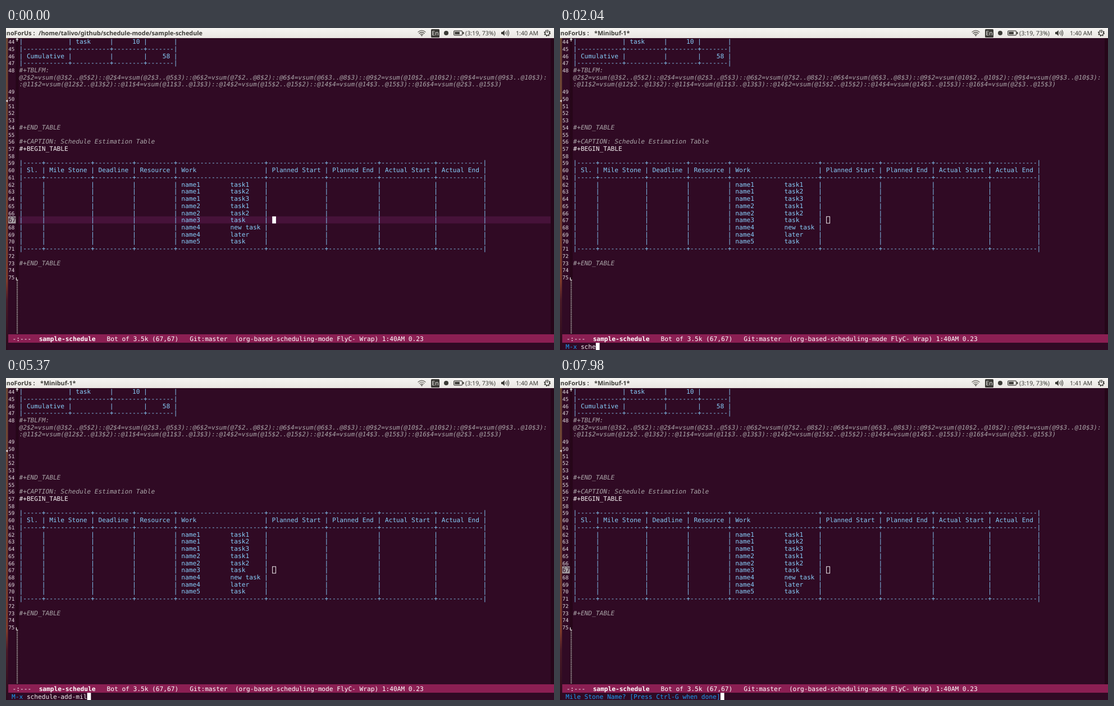
Recreate the animation shown at these times as an HTML page. Size 976 px wide and 574 px high, loop 8 s.

```html
<!DOCTYPE html>
<html lang="en">
<head>
<meta charset="utf-8">
<title>Schedule editor</title>
<style>
  html, body { margin: 0; width: 100%; height: 100%; overflow: hidden; background: #300a24; }
  svg { display: block; width: 976px; height: 574px; }
  text { white-space: pre; text-rendering: geometricPrecision; }
  .m { font: 11.174px "DejaVu Sans Mono", monospace; }
  .n { font-size: 9.2px; fill: #e6e0e3; }
  .ui { font: 10.6px "Noto Sans", "Open Sans", sans-serif; fill: #3c3b37; }
  .title { font-weight: 700; font-size: 10.8px; }
  .tbl { fill: #87cefa; }
  .com { fill: #aaa5a8; font-style: italic; }
  .txt { fill: #f2eef0; }
  .prompt { fill: #1c9cf4; }
</style>
</head>
<body>
<svg id="stage" viewBox="0 0 976 574" xmlns="http://www.w3.org/2000/svg" xml:space="preserve"></svg>
<script>
// Character cell, and the left edges of the minibuffer and the text area
const CW = 6.727, LH = 12.727, MINI = 10, X0 = MINI + 2 * CW;
const stage = document.getElementById('stage');
const base = row => 28.1 + row * LH;
const rect = (x, y, w, h, fill, more = '') =>
  `<rect x="${x}" y="${y}" width="${w}" height="${h}" fill="${fill}" ${more}/>`;
const text = (x, y, cls, s, more = '') =>
  `<text x="${x}" y="${y}" class="${cls}" ${more}>${s}</text>`;
const path = (d, stroke, w, more = '') =>
  `<path d="${d}" fill="none" stroke="${stroke}" stroke-width="${w}" ${more}/>`;

// Table helpers: column widths include the padding spaces
const rule = ws => '|' + ws.map(w => '-'.repeat(w)).join('+') + '|';
const cells = (ws, vals) => '|' + ws.map((w, i) => (' ' + (vals[i] || '')).padEnd(w)).join('|') + '|';

const sums = [12, 10, 8, 7];
const plan = [5, 12, 10, 10, 23, 15, 13, 14, 12];
const heads = ['Sl.', 'Mile Stone', 'Deadline', 'Resource', 'Work',
  'Planned Start', 'Planned End', 'Actual Start', 'Actual End'];
const works = [['name1', 'task1'], ['name1', 'task2'], ['name1', 'task3'], ['name2', 'task1'],
  ['name2', 'task2'], ['name3', 'task'], ['name4', 'new task'], ['name4', 'later'], ['name5', 'task']];

// [line number, class, content]; a null number continues the line above
const lines = [
  [44, 'tbl', cells(sums, ['', 'task', '    10'])],
  [45, 'tbl', rule(sums)],
  [46, 'tbl', cells(sums, ['Cumulative', '', '', '   58'])],
  [47, 'tbl', rule(sums)],
  [48, 'com', '#+TBLFM:'],
  [null, 'com', '@2$2=vsum(@3$2..@5$2)::@2$4=vsum(@2$3..@5$3)::@6$2=vsum(@7$2..@8$2)::@6$4=vsum(@6$3..@8$3)::@9$2=vsum(@10$2..@10$2)::@9$4=vsum(@9$3..@10$3):'],
  [null, 'com', ':@11$2=vsum(@12$2..@13$2)::@11$4=vsum(@11$3..@13$3)::@14$2=vsum(@15$2..@15$2)::@14$4=vsum(@14$3..@15$3)::@16$4=vsum(@2$3..@15$3)'],
  [49], [50], [51], [52], [53],
  [54, 'com', '#+END_TABLE'],
  [55],
  [56, 'com', '#+CAPTION: Schedule Estimation Table'],
  [57, 'txt', '#+BEGIN_TABLE'],
  [58],
  [59, 'tbl', rule(plan)],
  [60, 'tbl', cells(plan, heads)],
  [61, 'tbl', rule(plan)],
  ...works.map(([who, job], i) => [62 + i, 'tbl', cells(plan, ['', '', '', '', who.padEnd(13) + job])]),
  [71, 'tbl', rule(plan)],
  [72],
  [73, 'com', '#+END_TABLE'],
  [74], [75]
];

const numbers = lines.map(([n], i) => n ? text(4.2, base(i), 'm n', n, n === 67 ? 'id="num"' : '') : '').join('');
const body = lines.map(([, cls, s], i) => s ? text(X0, base(i), 'm ' + cls, s) : '').join('');

const panel = rect(0, 0, 976, 18, 'url(#bar)')
  + text(51.5, 12.8, 'ui title', 'noForUs :', 'text-anchor="end"')
  + text(58, 12.8, 'ui title', '', 'id="title"')
  + path('M733.5 7.5Q740.5 1.5 747.5 7.5', '#77746e', 1.3)
  + path('M735.5 10Q740.5 5.5 745.5 10', '#55524d', 1.3, 'id="wifi"')
  + path('M737.7 12Q740.5 9.6 743.3 12', '#55524d', 1.3)
  + '<circle cx="740.5" cy="13.4" r="1.1" fill="#3c3b37"/>'
  + rect(757, 2, 15, 15, '#3c3b37', 'rx="1.5"')
  + text(764.5, 13, 'ui', 'En', 'text-anchor="middle" style="fill:#f5f3f0"')
  + '<circle cx="784" cy="9" r="4" fill="#3c3b37"/>'
  + rect(797.6, 5.1, 15, 7.8, 'none', 'rx="1.5" stroke="#3c3b37" stroke-width="1.2"')
  + rect(799.3, 6.8, 8.6, 4.4, '#3c3b37') + rect(813.5, 7, 2, 4, '#3c3b37')
  + text(818, 12.8, 'ui', '(3:19, 73%)')
  + '<path d="M882 7h2.4l3.4-3v10l-3.4-3h-2.4z" fill="#3c3b37"/>'
  + path('M889.5 6.8q1.6 2.2 0 4.4M891.6 5q3 4 0 8M893.8 3.5q4 5.5 0 11', '#3c3b37', 1.1)
  + text(908, 12.8, 'ui', '', 'id="clock"')
  + '<circle cx="964" cy="9" r="3.9" fill="none" stroke="#3c3b37" stroke-width="1.5"/>'
  + '<circle cx="964" cy="9" r="5.1" fill="none" stroke="#3c3b37" stroke-width="1.8" stroke-dasharray="2 2.006"/>'
  + rect(962.2, 2.5, 3.6, 4.5, '#efedea') + rect(963.3, 3, 1.4, 6, '#3c3b37');

const mode = rect(4, 546, 972, 15, '#8b1f53')
  + text(4.9, 557.6, 'm', ' -:---  <tspan font-weight="700">sample-schedule</tspan>   Bot of 3.5k (67,67)   Git:master  (org-based-scheduling-mode FlyC- Wrap) 1:40AM 0.23', 'fill="#fff"');

stage.innerHTML = `<defs>
  <linearGradient id="bar" x2="0" y2="1"><stop stop-color="#f6f4f2"/><stop offset="1" stop-color="#e9e6e2"/></linearGradient>
  <linearGradient id="desk" x2="0" y2="1"><stop stop-color="#6c4736"/><stop offset=".5" stop-color="#75402f"/>
    <stop offset=".78" stop-color="#7d3a2b"/><stop offset=".84" stop-color="#4a1a27"/><stop offset="1" stop-color="#2a0a1c"/></linearGradient>
</defs>`
  + rect(0, 0, 976, 574, '#300a24')
  + rect(17.4, 18, 5.2, 528, '#260619')
  + rect(970, 18, 6, 528, '#260619')
  + rect(0, 18, 3.5, 556, 'url(#desk)')
  + '<path d="M0 130l3-2.6v5.2z" fill="#f2eef0"/>'
  + rect(22.6, 335.8, 947.4, 12.6, '#461239', 'id="hl"')
  + rect(4, 335.8, 13.4, 12.6, '#a5a0a3', 'id="numBox"')
  + numbers + body
  + path('M19.8 24v-4.5M17.8 20.8l2-2 2 2', '#f2eef0', 1.2)
  + path('M18.4 444.5v4.5h3', '#f2eef0', 1.2)
  + path('M20 450v95', '#c9c2c6', 2.6, 'stroke-dasharray="1 1.4"')
  + mode
  + text(MINI, 571.5, 'm prompt', '', 'id="prompt"')
  + text(MINI + 4 * CW, 571.5, 'm txt', '', 'id="typed"')
  + rect(X0 + 67 * CW, 335.8, CW, 12.6, '#fff', 'id="point"')
  + rect(X0 + 67 * CW + .4, 336.2, CW - .8, 11.8, 'none', 'id="hollow" stroke="#f2eef0"')
  + rect(0, 561.2, CW, 12.8, '#fff', 'id="caret"')
  + panel
  + '<path id="mouse" d="M0 0v11.2l2.6-2.4 1.8 4.1 1.9-.8-1.8-4h3.6z" fill="#fff" stroke="#222" stroke-width=".7"/>';

const el = {};
stage.querySelectorAll('[id]').forEach(e => el[e.id] = e);

const cmd = 'schedule-add-mile-stones-to-table';
const ask = 'Mile Stone Name? [Press Ctrl-G when done]';
// Each step changes part of the state; "n" is the number of typed letters
const steps = [
  [0, { focus: 'edit', on: 1, n: 0, mouse: null, prompt: '', wifi: '#55524d', clock: '1:40 AM' }],
  [250, { on: 0 }],
  [300, { mouse: [4, 125] }], [350, { mouse: [230, 138] }], [400, { mouse: [407, 147] }],
  [740, { on: 1 }], [1230, { on: 0 }],
  [1390, { focus: 'mini', on: 1, prompt: 'M-x ' }],
  [1560, { n: 1 }], [1610, { mouse: null }], [1740, { n: 2 }],
  [1950, { n: 3 }], [2040, { n: 4 }], [2250, { n: 5 }], [2450, { n: 9 }],
  [2950, { on: 0 }], [3140, { on: 1, n: 10 }], [3540, { n: 11 }],
  [4040, { on: 0 }], [4200, { on: 1, n: 12 }], [4460, { n: 13 }],
  [4790, { wifi: '#8d8a84' }],
  [4950, { on: 0 }], [5030, { on: 1, n: 14 }], [5180, { n: 15 }], [5370, { n: 16 }],
  [5490, { n: cmd.length }], [5980, { on: 0 }],
  [6030, { focus: 'ask', on: 1, n: 0, prompt: ask }],
  [6490, { on: 0 }], [6540, { clock: '1:41 AM' }],
  [6980, { on: 1 }], [7480, { on: 0 }], [7980, { on: 1 }]
];

const show = (e, yes) => e.setAttribute('visibility', yes ? 'visible' : 'hidden');

function draw(t) {
  const s = Object.assign({}, ...steps.filter(([at]) => at <= t).map(([, patch]) => patch));
  const edit = s.focus === 'edit', marked = s.focus !== 'mini';
  show(el.hl, edit);
  show(el.numBox, marked);
  el.num.style.fontSize = marked ? '11.174px' : '';
  el.num.style.fill = marked ? '#300a24' : '';
  show(el.point, edit && s.on);
  show(el.hollow, !edit);
  show(el.caret, !edit && s.on);
  el.caret.setAttribute('x', MINI + (s.prompt.length + s.n) * CW);
  el.prompt.textContent = s.prompt;
  el.typed.textContent = cmd.slice(0, s.n);
  el.title.textContent = edit ? '/home/talivo/github/schedule-mode/sample-schedule' : '*Minibuf-1*';
  el.title.setAttribute('x', edit ? 58 : 61);
  el.clock.textContent = s.clock;
  el.wifi.setAttribute('stroke', s.wifi);
  show(el.mouse, s.mouse);
  if (s.mouse) el.mouse.setAttribute('transform', `translate(${s.mouse})`);
}

const start = performance.now();
function tick() {
  draw((performance.now() - start) % 8000);
  requestAnimationFrame(tick);
}
draw(0);
requestAnimationFrame(tick);
</script>
</body>
</html>
```
